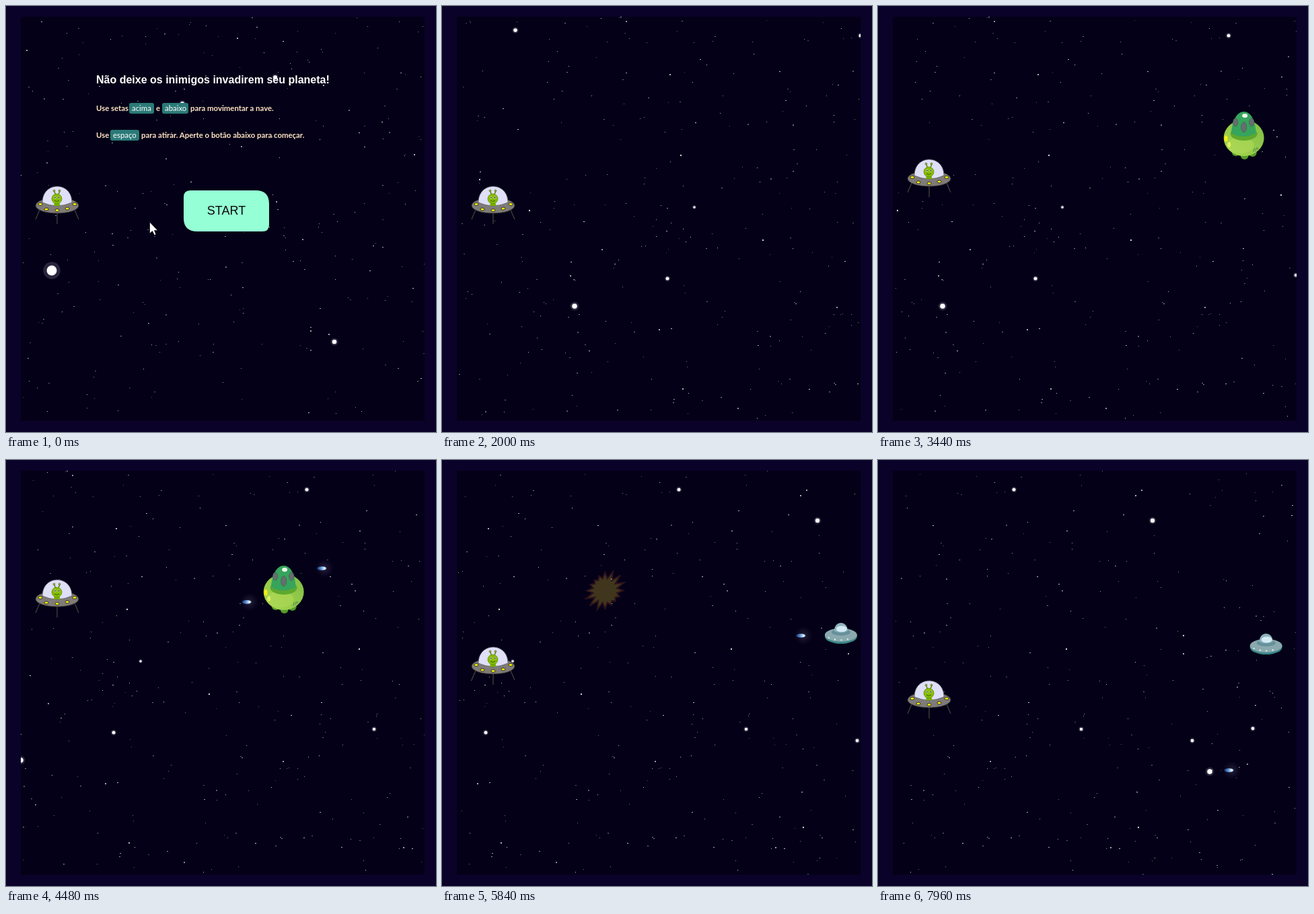
These frames come from a looping animation (639x633 px, 8 s). An HTML page:

```html
<!DOCTYPE html>
<html lang="pt">
<head>
<meta charset="utf-8">
<style>
  html, body { margin: 0; height: 100%; overflow: hidden; background: #0a0228; }
  svg { display: block; width: 639px; height: 633px; }
  .title { font: bold 16px "Liberation Sans", Arial, sans-serif; fill: #fff; }
  .help { font: bold 11.4px Lato, sans-serif; fill: #ffe4c4; }
  .help rect { fill: #2b7a78; }
  .help .key { font-weight: normal; fill: #fff; }
  .start { font: 18px "Liberation Sans", Arial, sans-serif; text-anchor: middle; fill: #0a0a0a; }
  .dot { shape-rendering: crispEdges; }
</style>
</head>
<body>
<svg viewBox="0 0 639 633">
  <defs>
    <clipPath id="stage"><rect x="22" y="16" width="600" height="600"/></clipPath>
    <linearGradient id="beam">
      <stop offset="0" stop-color="#16356f"/>
      <stop offset=".45" stop-color="#5f9ae0"/>
      <stop offset=".8" stop-color="#eef7ff"/>
      <stop offset="1" stop-color="#7ea4dc"/>
    </linearGradient>
    <radialGradient id="halo">
      <stop offset="0" stop-color="#9fa4d8" stop-opacity=".22"/>
      <stop offset="1" stop-color="#6a5a80" stop-opacity="0"/>
    </radialGradient>
    <linearGradient id="skin" x1="1" x2="0" y2="1">
      <stop offset="0" stop-color="#7fbd45"/>
      <stop offset="1" stop-color="#aad750"/>
    </linearGradient>
    <g id="laser">
      <circle cx="4" r="14" fill="url(#halo)"/>
      <ellipse rx="7" ry="2.8" fill="url(#beam)"/>
    </g>
    <g id="blob">
      <g fill="#569a28"><circle cx="-12" cy="24" r="6"/><circle cx="1" cy="29" r="6"/><circle cx="13" cy="25" r="6"/></g>
      <ellipse cy="3" rx="30" ry="27" fill="url(#skin)"/>
      <ellipse cx="-5" cy="14" rx="20" ry="12" fill="#b0da58" opacity=".6"/>
      <ellipse cy="-3" rx="20" ry="10" fill="#5fa82e"/>
      <path d="M-19-4C-17-24-10-36 0-36S17-24 18-4Q0 6-19-4Z" fill="#36a45c"/>
      <g fill="#686d70" stroke="#3f6f55"><ellipse cx="-12.500" cy="-20" rx="3.500" ry="6"/><ellipse cy="-13" rx="4" ry="7.500"/><ellipse cx="11.500" cy="-20" rx="3.500" ry="6"/></g>
      <ellipse cx="1.500" cy="-30" rx="4" ry="3" fill="#efffee"/>
      <g fill="#f3ee12"><ellipse cx="-26.500" cy="4" rx="2.500" ry="4.500"/><ellipse cx="-22" cy="13" rx="2.500" ry="4" fill="#def25a"/></g>
      <path d="M14 24l2-6M17 23l2-6M20 21l1-4" stroke="#4b8a4a"/>
    </g>
    <g id="saucer">
      <ellipse cy="1" rx="24" ry="11" fill="#3b8789"/>
      <ellipse cy="-1" rx="24" ry="10" fill="#8aa9ae"/>
      <ellipse cy="-5" rx="14" ry="5" fill="#66909a"/>
      <path d="M-10-7C-10-23 10-23 10-7Q0-2-10-7Z" fill="#8db4bd"/>
      <ellipse cx="1" cy="-10" rx="8" ry="4.500" fill="#d4ebf4"/>
      <path d="M-18 3Q0 10 18 3" fill="none" stroke="#e4fff5" stroke-width="2.200" stroke-linecap="round" stroke-dasharray="0 9.500"/>
    </g>
    <polygon id="blast" fill="#f5dc30" stroke="#b04a28" stroke-width="2"/>
  </defs>

  <g clip-path="url(#stage)">
    <rect x="22" y="16" width="600" height="600" fill="#040017"/>
    <g id="menuSky"></g>
    <g id="gameSky"></g>

    <g id="menu">
      <text class="title" x="134" y="115">Não deixe os inimigos invadirem seu planeta!</text>
      <g class="help">
        <rect x="183" y="144" width="37" height="16" rx="3"/>
        <rect x="232" y="144" width="39" height="16" rx="3"/>
        <rect x="155" y="184" width="43" height="16" rx="3"/>
        <text y="156"><tspan x="134">Use setas</tspan><tspan class="key" x="187">acima</tspan><tspan x="223">e</tspan><tspan class="key" x="236">abaixo</tspan><tspan x="274">para movimentar a nave.</tspan></text>
        <text y="196"><tspan x="134">Use</tspan><tspan class="key" x="159">espaço</tspan><tspan x="201">para atirar. Aperte o botão abaixo para começar.</tspan></text>
      </g>
      <path id="button" d="M274 274H371Q391 274 391 294V325Q391 335 381 335H284Q264 335 264 315V284Q264 274 274 274Z"/>
      <text class="start" x="327.500" y="310">START</text>
    </g>

    <g id="enemies"></g>

    <g id="ship">
      <path d="M50 303L44 317M76 306V324M102 303L108 317" stroke="#3b3936" stroke-width="1.500"/>
      <ellipse cx="76" cy="296.500" rx="32" ry="11.500" fill="#7f7b79" stroke="#35322f"/>
      <path d="M54 292C54 260 98 260 98 292Q76 302 54 292Z" fill="#dfdff8" stroke="#55525a" stroke-width=".8"/>
      <path d="M74 281L71.500 275M77.500 281L80 275" stroke="#5d7d10" stroke-width="1.500"/>
      <g fill="#8fae3a" stroke="#55680f" stroke-width=".6"><circle cx="71.500" cy="274.500" r="1.500"/><circle cx="79.500" cy="274.500" r="1.500"/></g>
      <path d="M72 292H79L81 297H71Z" fill="#76b000"/>
      <circle cx="75.500" cy="286.500" r="7.500" fill="#85bd00" stroke="#5b8600" stroke-width=".7"/>
      <g fill="#222" stroke="#d9e9a8"><circle cx="73" cy="284.500" r="1.400"/><circle cx="78.500" cy="284.500" r="1.400"/></g>
      <path d="M72 289Q75 292 79 289" fill="none" stroke="#3c5c00"/>
      <g fill="#f4f400" stroke="#35322f"><ellipse cx="51" cy="294.500" rx="3" ry="2"/><ellipse cx="60" cy="302" rx="3" ry="2"/><ellipse cx="76" cy="303.500" rx="3" ry="2"/><ellipse cx="91" cy="301" rx="3" ry="2"/><ellipse cx="102" cy="294.500" rx="3" ry="2"/></g>
    </g>

    <g id="lasers"></g>
    <g id="cursor" fill="#fff" stroke="#111" stroke-width=".8">
      <path id="arrow" d="M0 0V17L4 13.500L7 19.500L9.500 18.500L7 12.500H12Z"/>
      <path id="hand" d="M-1.500 0Q0-1.500 1.500 0V6L9 8Q10 9 10 12L8 19H0L-6 11Q-5 8-1.500 11Z"/>
    </g>
  </g>
</svg>
<script>
const LOOP = 8000, GAME_START = 1000;
const SKY_SPEED = 0.0704, LASER_SPEED = 0.512, FADE = 2100;
const SHIP_X = 74, SHIP_Y = 301, SPAWN_X = 598, EXIT_X = 96;
const $ = id => document.getElementById(id);

function add(parent, tag, attrs) {
  const el = document.createElementNS("http://www.w3.org/2000/svg", tag);
  for (const key in attrs) el.setAttribute(key, attrs[key]);
  return parent.appendChild(el);
}
const move = (el, x, y) => el.setAttribute("transform", `translate(${x} ${y})`);
const show = (el, on) => { el.style.display = on ? "" : "none"; };

function randomizer(seed) {
  return () => (seed = seed * 16807 % 2147483647) / 2147483647;
}

// Seeded dust and small stars, plus the few large stars as x, y, radius.
function fillSky(sky, seed, width, large) {
  const random = randomizer(seed);
  const place = () => [Math.floor(22 + random() * width), Math.floor(16 + random() * 600)];
  for (let i = 0; i < width * 0.42; i++) {
    const [x, y] = place();
    add(sky, "rect", {
      class: "dot", fill: "#e4e8f6", opacity: 0.3 + 0.6 * random(),
      x, y, width: random() < 0.3 ? 2 : 1, height: 1
    });
  }
  for (let i = 0; i < width / 35; i++) {
    const [cx, cy] = place();
    add(sky, "circle", { cx, cy, r: 0.7 + 0.5 * random(), fill: "#fff", opacity: 0.85 });
  }
  for (const [cx, cy, r] of large) {
    add(sky, "circle", { cx, cy, r: r * 1.7, fill: "#b9b9d0", opacity: 0.2 });
    add(sky, "circle", { cx, cy, r, fill: "#fff" });
  }
}

fillSky($("menuSky"), 41, 600, [[68, 393, 7.5], [488, 499, 3.3], [400, 106, 3], [262, 145, 3]]);
fillSky($("gameSky"), 977, 1020, [
  [109, 36, 2.8], [375, 299, 1.8], [335, 405, 2.5], [197, 446, 3.8], [622, 44, 2.5],
  [722, 400, 2.3], [828, 90, 3.2], [887, 417, 2.4], [913, 463, 3.8], [977, 399, 2.4]
]);

// Sixteen spikes, stretched along one diagonal.
$("blast").setAttribute("points", Array.from({ length: 32 }, (_, i) => {
  const angle = i * Math.PI / 16 - Math.PI / 2;
  const radius = i % 2 ? 18 : 27 + 5 * Math.cos(2 * angle + Math.PI / 2);
  return `${(radius * Math.cos(angle)).toFixed(1)},${(radius * Math.sin(angle)).toFixed(1)}`;
}).join(" "));

// Key presses, in ms; every arrow key moves the ship one lane.
const keys = {
  up: [3200, 3520, 3640, 7250, 7400],
  down: [3820, 4700, 5300, 5900, 6820, 6960],
  space: [3709, 3927, 4944, 5942, 6473, 7087]
};
const pressed = (key, t) => keys[key].filter(time => time <= t).length;

function shipOffset(t) {
  return t < keys.up[0] ? 0 : 10 + 50 * (pressed("down", t) - pressed("up", t));
}

const lasers = keys.space.map(fired => ({
  fired, y: SHIP_Y + shipOffset(fired), end: LOOP,
  el: add($("lasers"), "use", { href: "#laser" })
}));
const laserX = (laser, t) => SHIP_X + (t - laser.fired) * LASER_SPEED;

function spawn(shape, born, y, speed, radius) {
  const enemy = {
    born, y, speed, hit: LOOP,
    body: add($("enemies"), "use", { href: "#" + shape }),
    blast: add($("enemies"), "use", { href: "#blast" })
  };
  for (const laser of lasers) {
    const gap = SPAWN_X - radius - laserX(laser, born);
    const meet = born + gap / (speed + LASER_SPEED);
    if (Math.abs(laser.y - y) < 20 && meet > Math.max(born, laser.fired)) {
      enemy.hit = laser.end = meet;
      break;
    }
  }
  return enemy;
}
const enemies = [
  spawn("blob", 3010, 193, 0.126, 30),
  spawn("saucer", 5820, 261, 0.245, 24),
  spawn("saucer", 7874, 277, 0.245, 24)
];

function drawMenu(t) {
  const p = Math.min(1, Math.max(0, (t - 60) / 600));
  const ease = p * p * (3 - 2 * p);
  const cursorX = 213.5 + 116 * ease;
  const hover = cursorX > 264;
  move($("cursor"), cursorX, 321 - 14 * ease);
  show($("arrow"), !hover);
  show($("hand"), hover);
  $("button").setAttribute("fill", hover ? "#7cebbf" : "#95ffd5");
}

function drawGame(t) {
  move($("gameSky"), Math.round((2000 - t) * SKY_SPEED), 0);
  move($("ship"), 0, shipOffset(t));

  for (const { born, y, speed, hit, body, blast } of enemies) {
    const x = SPAWN_X - (t - born) * speed;
    const alive = t < hit;
    move(body, x, y);
    move(blast, x + 1, y + 1);
    show(body, t >= born && alive);
    show(blast, !alive && x > EXIT_X);
    blast.setAttribute("opacity", Math.max(0, 0.65 * (1 - (t - hit) / FADE)));
  }

  for (const laser of lasers) {
    const x = laserX(laser, t);
    move(laser.el, x, laser.y);
    show(laser.el, t >= laser.fired && t < laser.end && x < 600);
  }
}

function tick() {
  const t = performance.now() % LOOP;
  const playing = t >= GAME_START;
  for (const id of ["menuSky", "menu", "cursor"]) show($(id), !playing);
  show($("gameSky"), playing);
  drawMenu(t);
  drawGame(t);
  requestAnimationFrame(tick);
}
tick();
</script>
</body>
</html>
```
